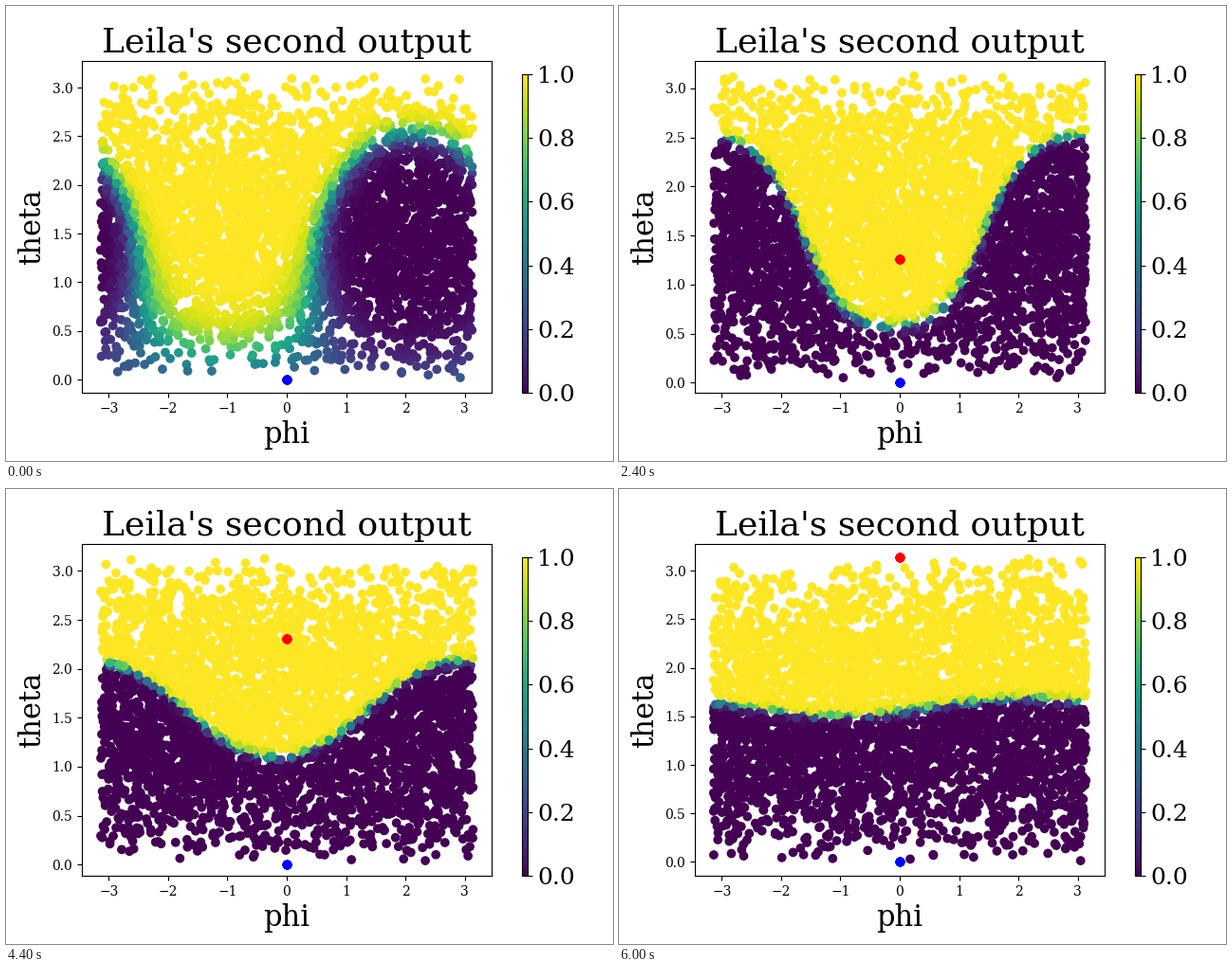
Write a matplotlib script that moves like this. It is 640 px wide and 480 px high and loops after 6200 ms.

```python
import numpy as np
import matplotlib.pyplot as plt
from matplotlib.animation import FuncAnimation
from matplotlib.cm import ScalarMappable
from matplotlib.colors import Normalize

plt.rcParams["font.family"] = "DejaVu Serif"

FRAMES, POINTS, OVERDRAW = 31, 4000, 20


def angle(i):
    """Theta of the red state, moving steadily from pole to pole."""
    return np.pi * i / (FRAMES - 1)


def sample(i):
    """Points spread evenly over the sphere."""
    rng = np.random.default_rng(100 + i)
    phi = rng.uniform(-np.pi, np.pi, POINTS)
    theta = np.arccos(rng.uniform(-1, 1, POINTS))
    return phi, theta


def output(i, phi, theta):
    """Soft split of the sphere by a plane between the two states."""
    settle, fade = np.exp(-i / 3), np.exp(-i / 8)
    tilt = 0.47 * angle(i) + 0.4 * settle
    ny = -0.08 - 0.7 * settle
    nx = np.sqrt(np.cos(tilt) ** 2 - ny**2)
    nz = -np.sin(tilt)
    sin, cos = np.sin(theta), np.cos(theta)
    field = nx * sin * np.cos(phi) + ny * sin * np.sin(phi) + nz * cos
    # Early on the plane is shifted and bent inwards at the equator
    field += fade * (0.26 - 0.22 * sin**4) - 0.02
    slope = 50 - 44 * fade + 5 * (1 - cos)
    return 1 / (1 + np.exp(-slope * field))


fig, ax = plt.subplots(figsize=(6.4, 4.8), dpi=100)
fig.subplots_adjust(left=0.125, right=0.8, bottom=0.15, top=0.88)
ax.set_title("Leila's second output", fontsize=26)
ax.set_xlabel("phi", fontsize=22)
ax.set_ylabel("theta", fontsize=22)
ax.set_xlim(-1.1 * np.pi, 1.1 * np.pi)
ax.set_xticks(range(-3, 4))
ax.set_yticks(np.arange(0, 3.1, 0.5))

norm = Normalize(0, 1)
cloud = ax.scatter(np.zeros(POINTS), np.zeros(POINTS), c=np.zeros(POINTS),
                   cmap="viridis", norm=norm)
# Stacked markers give hard edges
stack = np.zeros(OVERDRAW)
red = ax.scatter(stack, stack, color="red")
blue = ax.scatter(stack, stack, color="blue")

cax = fig.add_axes([0.85, 0.15, 0.01, 0.7])
bar = fig.colorbar(ScalarMappable(norm, "viridis"), cax=cax,
                   ticks=np.linspace(0, 1, 6))
bar.ax.tick_params(labelsize=18)


def update(i):
    phi, theta = sample(i)
    cloud.set_offsets(np.column_stack([phi, theta]))
    cloud.set_array(output(i, phi, theta))
    red.set_offsets(np.column_stack([stack, stack + angle(i)]))
    low, high = theta.min(), theta.max()
    pad = 0.05 * (high - low)
    ax.set_ylim(low - pad, high + pad)
    return cloud, red, blue


anim = FuncAnimation(fig, update, frames=FRAMES, interval=200,
                     init_func=lambda: update(0), repeat=True, repeat_delay=0)
plt.show()
```
